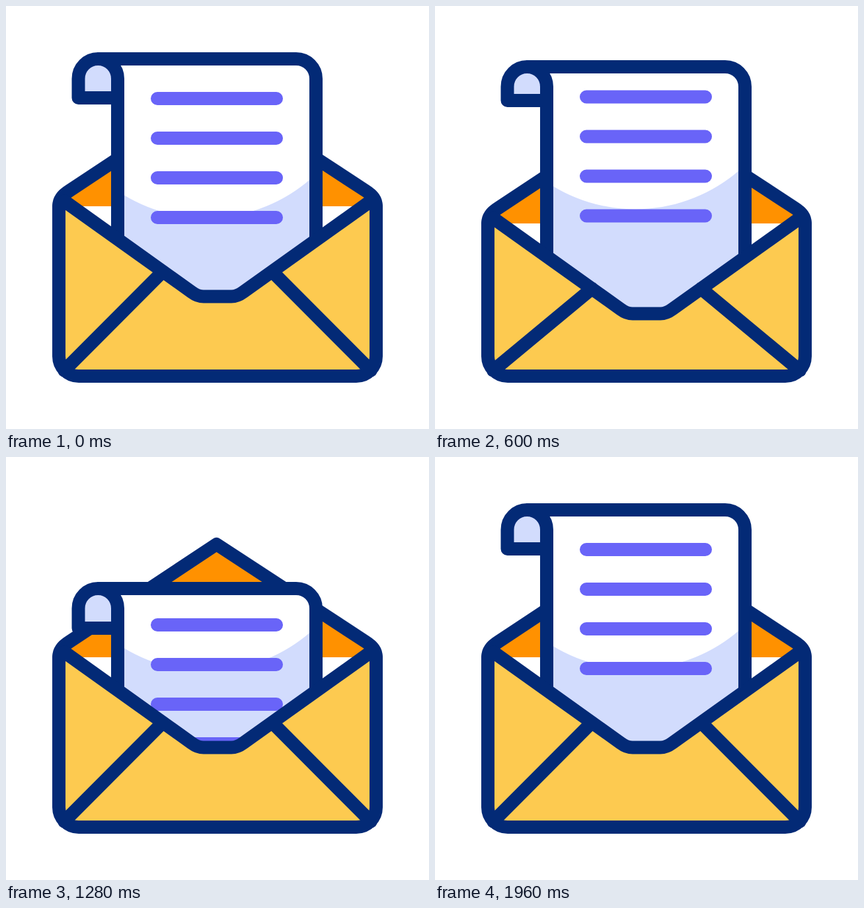
Write an HTML page that moves like this. It is 640 px wide and 640 px high and loops after 2 s.

```html
<!DOCTYPE html>
<html lang="en">
<head>
<meta charset="utf-8">
<title>Envelope with letter</title>
<style>
  html, body { margin: 0; width: 100%; height: 100%; overflow: hidden; background: #fff; }
  svg { display: block; width: 100%; height: 100%; }
  .ink { fill: none; stroke: #032a76; stroke-width: 20; stroke-linejoin: round; stroke-linecap: round; }
  .flap { fill: #ff9100; }
  .pocket { fill: #fdca50; }
  .sheet { fill: #fff; }
  .shade, .curl { fill: #d2dcfd; }
  .text { fill: none; stroke: #6964f8; stroke-width: 20; stroke-linecap: round; }
</style>
</head>
<body>
<svg viewBox="0 0 640 640">
  <g id="back">
    <path class="flap ink" style="fill:#ff9100"
      d="M80 303C80 293 85 286.5 96 279.5L318.5 132L544 279.5C555 286.5 560 293 560 303"/>
  </g>
  <path id="sheet" class="sheet"/>
  <path id="shade" class="shade" d="M169 280A240 240 0 0 0 469 254.3V520H169Z"/>
  <path id="text" class="text" d="M229 140H409M229 200H409M229 260H409M229 320H409"/>
  <path id="curl" class="curl"/>
  <path id="edge" class="ink"/>
  <path id="pocket" class="pocket"/>
  <path id="seams" class="ink"/>
</svg>
<script>
  const LOOP = 2000, STEP = 40;

  // Vertical offsets from the resting pose: [ms, px]
  const tracks = {
    top:    [[0, 0], [240, -23], [340, -37], [600, 26], [780, 0], [2000, 0]],
    bottom: [[0, 0], [240, -15], [340, -27], [500, 0], [2000, 0]],
    sheet:  [[0, 0], [240, -25], [340, -39], [560, 4], [600, 12], [960, 84], [1120, 109],
             [1280, 119], [1560, 119], [1760, 50], [1960, 0], [2000, 0]],
    curl:   [[0, 0], [240, -31], [340, -45], [600, 4], [960, 82],
             [1280, 120], [1560, 120], [1760, 51], [1960, 0], [2000, 0]],
    text:   [[0, 0], [240, -36], [340, -49], [600, -2.5], [960, 76],
             [1280, 114], [1560, 114], [1760, 48], [1960, 0], [2000, 0]],
    shade:  [[0, 0], [240, -25], [340, -36], [600, -13.5], [960, -2],
             [1280, 3], [1560, 3], [1760, 1], [1960, 0], [2000, 0]]
  };

  const slope = (a, b) => (b[1] - a[1]) / (b[0] - a[0]);

  // Tangent that never overshoots: flat at turning points, harmonic mean elsewhere
  function tangent(keys, i) {
    if (i === 0 || i === keys.length - 1) return 0;
    const a = slope(keys[i - 1], keys[i]), b = slope(keys[i], keys[i + 1]);
    return a * b <= 0 ? 0 : 2 * a * b / (a + b);
  }

  function sample(keys, t) {
    let i = 0;
    while (i < keys.length - 2 && t >= keys[i + 1][0]) i++;
    const [t0, y0] = keys[i], [t1, y1] = keys[i + 1];
    const h = t1 - t0, u = (t - t0) / h, w = 1 - u;
    return y0 * w * w * (1 + 2 * u) + y1 * u * u * (3 - 2 * u)
      + h * u * w * (tangent(keys, i) * w - tangent(keys, i + 1) * u);
  }

  const $ = id => document.getElementById(id);
  const draw = (id, d) => $(id).setAttribute('d', d);
  const shift = (id, y) => $(id).setAttribute('transform', `translate(0 ${y})`);

  function render(t) {
    const at = {};
    for (const name in tracks) at[name] = sample(tracks[name], t);
    const v = y => (y + at.top).toFixed(2);
    const b = y => (y + at.bottom).toFixed(2);
    const p = y => (y + at.sheet).toFixed(2);
    const c = y => (y + at.curl).toFixed(2);

    shift('back', at.top);
    shift('shade', at.shade);
    shift('text', at.text);

    const corner = `H439A30 30 0 0 1 469 ${p(110)}V420`;
    draw('sheet', `M169 420V${p(80)}${corner}Z`);
    const roll = `M169 ${c(139)}H109.5V${p(110)}A29.75 30 0 0 1 169 ${p(110)}`;
    draw('curl', roll + 'Z');
    draw('edge', `${roll}V420M139.5 ${p(80)}${corner}`);

    const mouth = `L281 ${v(432.8)}Q290 ${v(439.5)} 299 ${v(439.5)}`
      + `H341Q350 ${v(439.5)} 359 ${v(432.8)}L552 ${v(295)}`;
    const base = `V${b(530)}A30 30 0 0 1 530 ${b(560)}H110A30 30 0 0 1 80 ${b(530)}V${v(303)}`;
    draw('pocket', `M88 ${v(295)}${mouth}L560 ${v(303)}${base}Z`);
    draw('seams', `M88 ${v(295)}${mouth}M560 ${v(303)}${base}`
      + `M237.5 ${v(401.5)}L88 ${b(551.5)}M402.5 ${v(401.5)}L552 ${b(551.5)}`);
  }

  const start = performance.now();
  function tick() {
    const t = (performance.now() - start) % LOOP;
    render(Math.floor(t / STEP) * STEP);
    requestAnimationFrame(tick);
  }
  tick();
</script>
</body>
</html>
```
